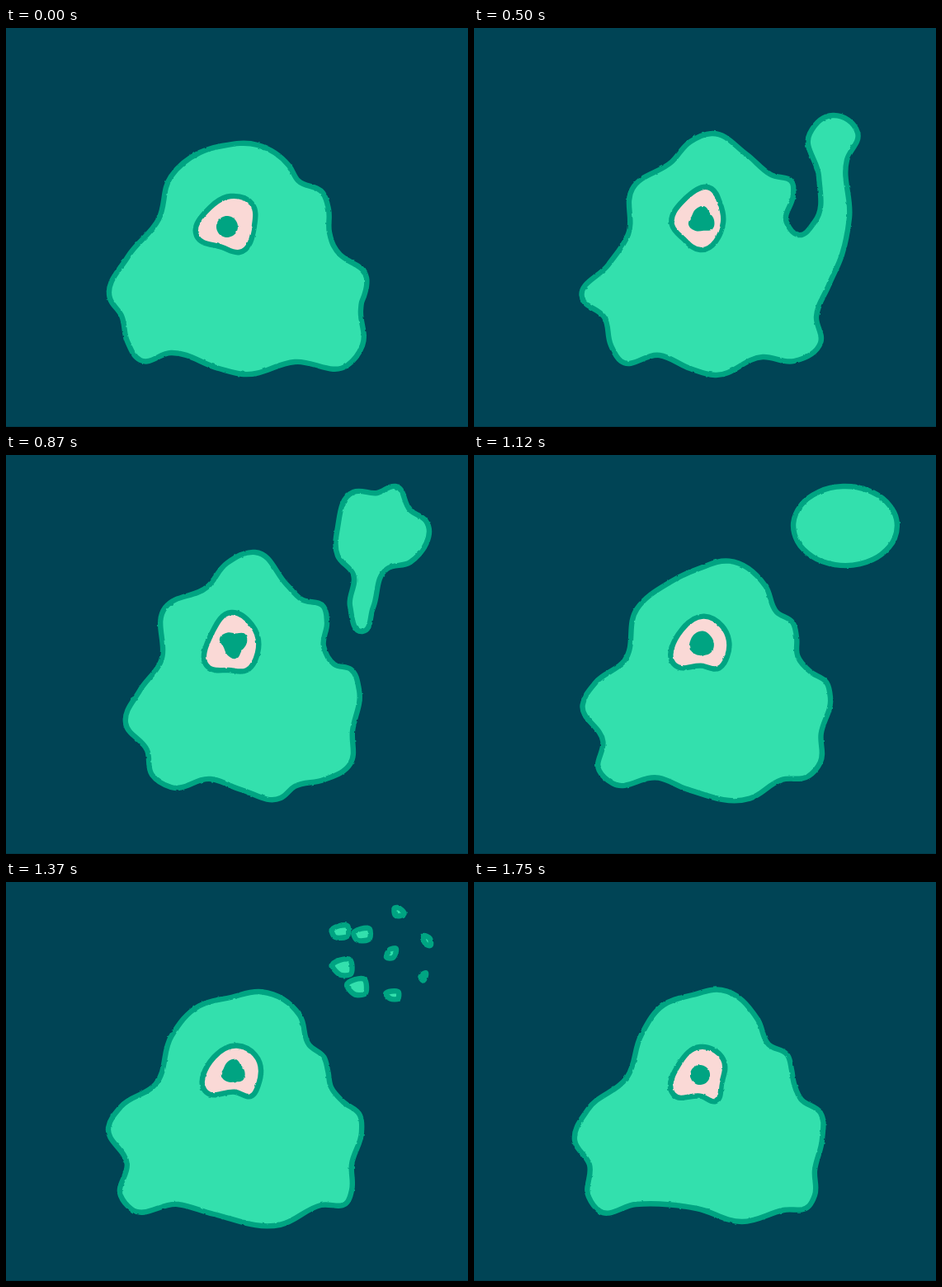
Recreate the animation shown at these times as an HTML page. Size 560x484 px, loop 1870 ms.

```html
<!DOCTYPE html>
<html lang="en">
<head>
<meta charset="utf-8">
<title>Slime</title>
<style>
  html, body { margin: 0; width: 100%; height: 100%; overflow: hidden; background: #004455; }
  svg { display: block; width: 560px; height: 484px; }
  .slime, .eye { stroke: #00a482; stroke-width: 6.4; stroke-linejoin: round; }
  .slime { fill: #33e0ad; }
  .eye { fill: #fad9d6; }
  .pupil { fill: #00a482; }
</style>
</head>
<body>
<svg viewBox="0 0 560 484">
  <filter id="rough" x="0" y="0" width="560" height="484" filterUnits="userSpaceOnUse" color-interpolation-filters="sRGB">
    <feTurbulence type="fractalNoise" baseFrequency=".2" seed="4"/>
    <feDisplacementMap in="SourceGraphic" scale="2.5" xChannelSelector="R" yChannelSelector="G"/>
  </filter>
  <rect y="483" width="560" height="1" fill="#003a49"/>
  <g id="scene" filter="url(#rough)"></g>
</svg>
<script>
const LOOP = 1870, STEPS = 15;
const scene = document.getElementById('scene');
const tracks = { body: {}, arm: {}, eye: {}, pupil: {} };

const parse = s => s.trim().split(/\s+/).map(p => p.split(',').map(Number));
const lerp = (a, b, t) => a + (b - a) * t;
const mix = (p, q, t) => p.map((a, i) => a.map((v, k) => lerp(v, q[i][k], t)));
const center = pts => [0, 1].map(k => pts.reduce((sum, p) => sum + p[k], 0) / pts.length);
const dist = (p, q) => Math.hypot(q[0] - p[0], q[1] - p[1]) || 1;

// Direction at p of the circle through a, p and b
function tangent(a, p, b) {
  const la = dist(a, p), lb = dist(p, b);
  const v = [0, 1].map(k => (p[k] - a[k]) / la * lb + (b[k] - p[k]) / lb * la);
  const len = Math.hypot(...v) || 1;
  return v.map(c => c / len);
}

// Closed round curve through the points
function blob(pts, cls, roundness = .36) {
  const n = pts.length, at = i => pts[(i + n) % n];
  const dirs = pts.map((p, i) => tangent(at(i - 1), p, at(i + 1)));
  const d = pts.map((p, i) => {
    const q = at(i + 1), reach = dist(p, q) * roundness;
    const c1 = p.map((v, k) => v + dirs[i][k] * reach);
    const c2 = q.map((v, k) => v - dirs[(i + 1) % n][k] * reach);
    return `C${c1} ${c2} ${q}`;
  });
  return `<path class="${cls}" d="M${pts[0]}${d.join('')}Z"/>`;
}

function ring(count, start, point) {
  return Array.from({ length: count }, (_, i) => point(start + i / count * 2 * Math.PI));
}

function pose(step, parts) {
  for (const name in parts) tracks[name][step] = parse(parts[name]);
}

function sample(name, step) {
  const track = tracks[name], keys = Object.keys(track).map(Number);
  const a = keys.filter(k => k <= step).pop(), b = keys.find(k => k >= step);
  return a === b ? track[a] : mix(track[a], track[b], (step - a) / (b - a));
}

// Key poses, clockwise; the pupil is "x,y radius,lobes"
pose(0, {
  body: `430,342 432,385 414,409 350,405 288,420 258,413 200,394 163,403 147,380 140,349 126,328
    148,277 185,232 200,180 235,151 262,143 305,142 343,167 354,185 384,200 391,220`,
  arm: '392,248 397,264 405,275 413,281 420,285 427,289 433,294 437,303 437,313 434,325 431,333',
  eye: '272,204 298,213 301,240 283,272 262,266 231,252 247,218',
  pupil: '268,241 13,0'
});
pose(2, {
  arm: '381,230 394,253 410,243 418,218 424,203 434,197 444,208 446,235 445,275 441,305 433,325',
  eye: '280,199 296,208 297,238 290,268 266,265 235,259 246,214',
  pupil: '269,240 14,-.17'
});
pose(4, {
  body: `415,350 420,382 388,404 350,399 292,421 262,413 225,397 178,404 166,385 158,351 131,327
    163,287 187,250 192,195 240,162 262,138 288,128 330,153 360,178 386,188 387,202`,
  arm: '379,236 393,251 413,235 418,180 407,128 435,106 465,127 452,160 455,230 446,275 430,312',
  eye: '288,195 298,212 302,236 274,269 253,255 240,239 254,209',
  pupil: '276,233 15,.15'
});
pose(6, {
  arm: '384,234 395,252 414,240 423,195 402,108 440,73 512,95 455,155 441,205 442,255 428,305'
});
pose(7, {
  body: `420,335 417,375 385,394 350,402 333,416 285,406 248,393 200,403 177,388 171,358 145,325
    162,286 187,252 193,185 244,160 268,131 302,118 340,157 358,175 385,184 389,203`,
  arm: '385,232 398,254 418,260 428,285',
  eye: '273,191 298,206 305,240 292,261 270,261 246,258 250,215',
  pupil: '276,229 15.5,-.2'
});
pose(10, {
  body: `421,340 421,372 416,387 384,390 335,417 245,405 212,391 152,396 139,380 149,342 125,292
    140,271 180,248 200,187 235,151 275,141 313,134 360,160 371,198 387,213 392,230`,
  arm: '396,250 412,267 432,284 434,300',
  eye: '282,198 302,208 308,246 300,257 278,253 243,254 253,210',
  pupil: '276,229 14.5,.17'
});
pose(14, {
  body: `413,350 413,380 406,393 375,398 325,412 270,396 196,391 152,399 139,382 140,343 122,313
    138,276 186,236 203,185 230,149 265,137 300,131 344,167 357,197 380,210 385,228`,
  arm: '388,245 396,263 420,280 422,312',
  eye: '274,200 302,215 300,245 293,266 276,260 242,258 249,220',
  pupil: '274,234 12,0'
});

// The drop that breaks off, gathers into a ball and bursts
const drop = parse(`421,45 450,46 472,38 490,67 509,80 490,130 462,138
  445,185 432,214 417,183 421,145 402,122 402,88`);
const ball = ring(drop.length, -2.1, a => [450 + 63 * Math.cos(a), 86 + 48 * Math.sin(a)]);
const pieces = [
  '398,61 447,47 447,76 406,79', '459,38 468,37 487,56 461,61', '491,66 511,75 512,96 501,94',
  '463,78 480,75 471,104 453,103', '387,105 441,88 442,132 412,134',
  '450,119 489,114 487,133 464,133', '490,107 502,100 494,123 487,112'
].map(parse);
// End of each flight and the piece it comes from
const flights = [
  [478, 30, 1], [397, 59, 0], [435, 64, 0], [514, 67, 2], [467, 85, 3],
  [404, 101, 4], [510, 116, 6], [429, 135, 4], [468, 144, 5]
];

const chip = pts => blob(pts, 'slime', .22);

function burst(travel, size) {
  return flights.map(([x, y, parent]) => {
    const pts = pieces[parent], c = center(pts);
    const to = [lerp(c[0], x, travel), lerp(c[1], y, travel)];
    return chip(pts.map(p => p.map((v, k) => to[k] + (v - c[k]) * size)));
  }).join('');
}

function splash(step) {
  if (step < 7 || step > 13) return '';
  if (step < 10) return blob(mix(drop, ball, (step - 7) / 2), 'slime');
  if (step === 10) return pieces.map(chip).join('');
  const age = step - 11;
  return burst(.7 + .27 * age, .4 - .14 * age);
}

function pupil([[x, y], [radius, lobes]]) {
  return blob(ring(9, 0, a => {
    const r = radius * (1 + lobes * Math.sin(3 * a));
    return [x + r * Math.cos(a), y + r * Math.sin(a)];
  }), 'pupil');
}

let shown = -1;
function draw() {
  const t = performance.now() % LOOP;
  // Steps of 125 ms, cut to whole hundredths of a second
  const step = Math.min(STEPS - 1, Math.floor((Math.floor(t / 10) + .5) / 12.5));
  if (step !== shown) {
    shown = step;
    scene.innerHTML = blob([...sample('arm', step), ...sample('body', step)], 'slime')
      + blob(sample('eye', step), 'eye') + pupil(sample('pupil', step)) + splash(step);
  }
  requestAnimationFrame(draw);
}
draw();
</script>
</body>
</html>
```
